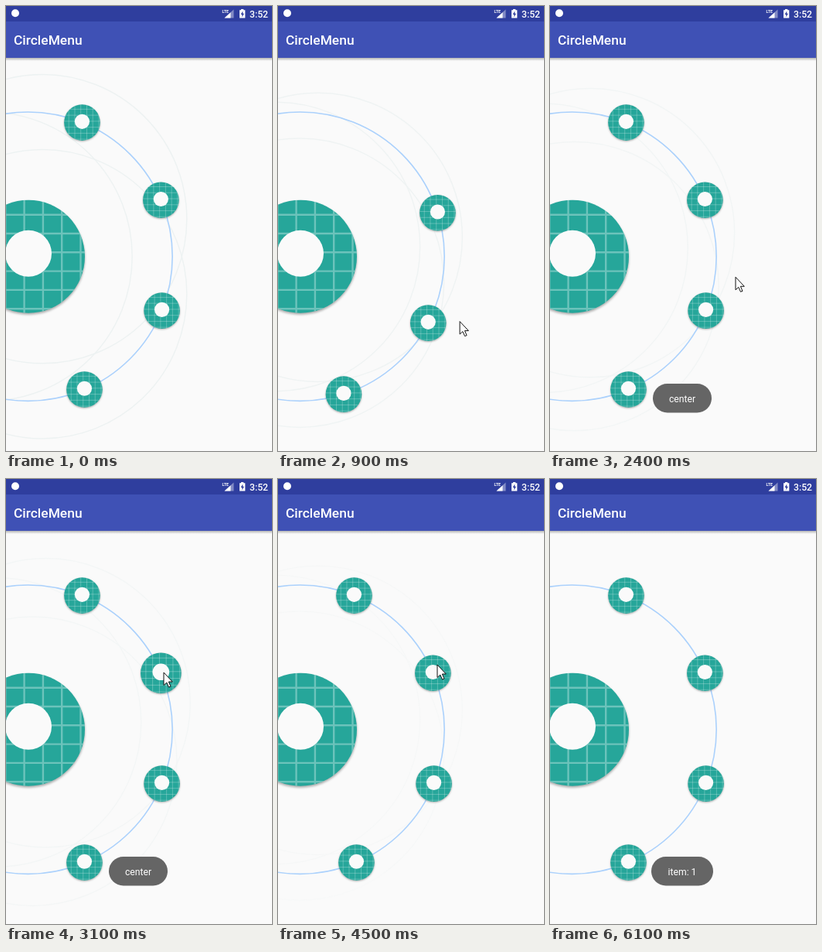
Animation of 344 by 575 pixels, one loop 6600 ms. Source, as an HTML page:

```html
<!DOCTYPE html>
<html lang="en">
<head>
<meta charset="utf-8">
<title>CircleMenu</title>
<style>
  html, body { margin: 0; width: 100%; height: 100%; overflow: hidden; background: #fafafa; }
  svg { display: block; width: 344px; height: 575px; }
  text { font-family: Roboto, "Open Sans", sans-serif; fill: #fff; }
  .icon { filter: drop-shadow(0 1.5px 1px rgba(0, 0, 0, .3)); }
  .hub { filter: drop-shadow(0 2.5px 1.5px rgba(0, 0, 0, .32)); }
</style>
</head>
<body>
<svg viewBox="0 0 344 575">
  <defs>
    <linearGradient id="fade" x2="0" y2="1">
      <stop offset="0" stop-color="#000" stop-opacity=".28"/>
      <stop offset="1" stop-color="#000" stop-opacity="0"/>
    </linearGradient>
    <clipPath id="disc"><circle r="73"/></clipPath>
    <g id="badge">
      <circle r="73" fill="#26a69a"/>
      <path id="grid" clip-path="url(#disc)" stroke="#fff" stroke-opacity=".32" stroke-width="2.4"/>
      <circle cy="-4" r="30" fill="#fafafa"/>
    </g>
  </defs>

  <rect width="344" height="575" fill="#fafafa"/>
  <g id="echoes" fill="none" stroke="#dfe9e9" stroke-width="1.5"></g>
  <circle cx="28.5" cy="323.7" r="186.7" fill="none" stroke="#abd1fc" stroke-width="1.6"/>
  <g class="hub"><use href="#badge" transform="translate(29 323.7)"/></g>
  <g id="items"></g>

  <rect y="67" width="344" height="4" fill="url(#fade)"/>
  <rect width="344" height="20" fill="#2f3e9e"/>
  <rect y="20" width="344" height="47" fill="#3f51b5"/>
  <text x="10" y="50.3" font-size="17.4" font-weight="500">CircleMenu</text>

  <circle cx="12" cy="9.3" r="5" fill="#fff"/>
  <text x="279.4" y="9" font-size="5.2" font-weight="700">LTE</text>
  <path d="M294.5 4.5V15.5H282.5Z" fill="#fff" fill-opacity=".4"/>
  <path d="M290.5 8.2V15.5H282.5Z" fill="#fff"/>
  <path d="M302 5.2H304V4H307.2V5.2H309.3V15.6H302Z" fill="#fff"/>
  <path d="M306.3 6.6L303.6 11H305.3V14.2L308 9.7H306.3Z" fill="#2f3e9e"/>
  <text x="315" y="14.6" font-size="12.2" font-weight="500">3:52</text>

  <g id="toast">
    <rect y="488" height="37.5" rx="18.75" fill="#656565"/>
    <text x="171" y="511.7" font-size="12.2" text-anchor="middle"></text>
  </g>
  <path id="cursor" d="M0 0V16.5L3.8 13L6.5 19L9 18L6.4 12H11.3Z"
        fill="#fff" stroke="#111"/>
</svg>
<script>
const LOOP = 6600, STEP = 100;
const CX = 28.5, CY = 323.7, R = 186.7;
const NS = 'http://www.w3.org/2000/svg';
const $ = id => document.getElementById(id);

// Smooth 0 to 1 between two times
function ramp(t, from, to) {
  const k = Math.min(1, Math.max(0, (t - from) / (to - from)));
  return k * k * (3 - 2 * k);
}

function polar(deg, r) {
  const a = deg * Math.PI / 180;
  return [CX + r * Math.cos(a), CY + r * Math.sin(a)];
}

const bearing = ([x, y]) => Math.atan2(y - CY, x - CX) * 180 / Math.PI;

// Pointer moves after the first sweep
const moves = [
  { from: 1000, to: 1600, x: 50, y: 306 },
  { from: 1700, to: 2150, x: 240, y: 270 },
  { from: 2100, to: 2450, x: 240, y: 355 },
  { from: 2400, to: 3050, x: 204, y: 250 },
  { from: 3100, to: 3700, x: 294, y: 232 },
  { from: 3900, to: 4500, x: 206, y: 240 },
  { from: 5300, to: 5650, x: 105, y: 255 },
  { from: 5600, to: 6050, x: 340, y: 120 }
];
const drags = [{ down: 200, up: 900 }, { down: 3100, up: 3900 }];

function pointer(t) {
  const sweep = ramp(t, 200, 900);
  let [x, y] = polar(-28.3 + 50.4 * sweep, 260 - 37 * sweep);
  for (const m of moves) {
    const k = ramp(t, m.from, m.to);
    x += (m.x - x) * k;
    y += (m.y - y) * k;
  }
  return [x, y];
}

// The ring follows a drag and swings home on release
function turnAt(t) {
  const drag = drags.findLast(d => t >= d.down);
  if (!drag) return 0;
  const pull = bearing(pointer(Math.min(t, drag.up))) - bearing(pointer(drag.down));
  return pull * (1 - ramp(t, drag.up, drag.up + 400));
}

function add(parent, tag, attrs) {
  const el = document.createElementNS(NS, tag);
  for (const k in attrs) el.setAttribute(k, attrs[k]);
  return parent.appendChild(el);
}

let lines = '';
for (let i = 0; i < 6; i++) {
  const p = i * 24.3 - 54;
  lines += `M${p} -73V73M-73 ${p}H73`;
}
$('grid').setAttribute('d', lines);

const items = [0, 1, 2, 3].map(i => {
  const box = add($('items'), 'g', { class: 'icon' });
  return { angle: i * 45 - 68, el: add(box, 'use', { href: '#badge' }) };
});
const echoes = [-69, 69, 180].map(angle => ({ angle, el: add($('echoes'), 'circle', { r: R }) }));
const [pill, label] = $('toast').children;

function draw(t) {
  const turn = turnAt(t);
  const grow = 1 + .5 * ramp(t, 2950, 3400) * (1 - ramp(t, 3900, 4300));
  items.forEach(({ angle, el }, i) => {
    const [x, y] = polar(angle + turn, R);
    const s = 23.3 / 73 * (i === 1 ? grow : 1);
    el.setAttribute('transform', `translate(${x} ${y}) scale(${s})`);
  });

  // Pale circles sway and die away
  const sway = Math.sin(Math.PI * t / 1800) ** 2;
  $('echoes').setAttribute('opacity', Math.max(0, .45 * (1 - t / 6100)));
  echoes.forEach(({ angle, el }) => {
    const [x, y] = polar(angle + 22 * sway, 52 - 18 * sway);
    el.setAttribute('cx', x);
    el.setAttribute('cy', y);
  });

  const late = t > 4500, width = late ? 80 : 76;
  const shown = late ? ramp(t, 5300, 5700) : ramp(t, 1700, 2000) * (1 - ramp(t, 3600, 4000));
  $('toast').setAttribute('opacity', shown);
  pill.setAttribute('x', 171 - width / 2);
  pill.setAttribute('width', width);
  label.textContent = late ? 'item: 1' : 'center';

  $('cursor').setAttribute('transform', `translate(${pointer(t)})`);
  $('cursor').setAttribute('visibility', t >= 100 && t < 6100 ? 'visible' : 'hidden');
}

const start = performance.now();
function tick() {
  const t = (performance.now() - start) % LOOP;
  draw(Math.floor(t / STEP) * STEP);
  requestAnimationFrame(tick);
}
tick();
</script>
</body>
</html>
```
